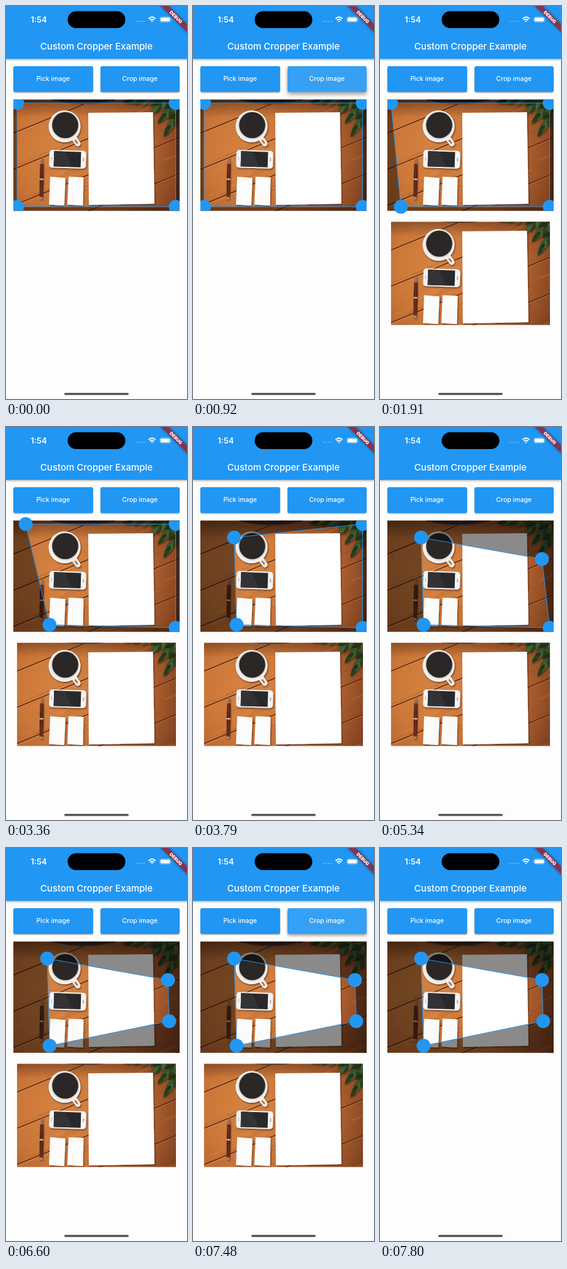
Animation of 295x640 px, one loop 8 s. Source, as an HTML page:

```html
<!DOCTYPE html>
<html lang="en">
<head>
<meta charset="utf-8">
<title>Custom Cropper Example</title>
<style>
  html, body { margin: 0; width: 100%; height: 100%; overflow: hidden; }
  body { position: relative; background: #fdfdfd; font-family: Inter, Roboto, sans-serif; color: #fff; }
  .bar { position: absolute; left: 0; top: 0; width: 295px; height: 86px; background: #2196f3;
    box-shadow: 0 1.5px 3px rgba(0,0,0,.35); }
  .title { position: absolute; top: 56px; width: 100%; font: 500 15px/19px Inter, Roboto, sans-serif; text-align: center; }
  .btn { position: absolute; top: 98px; width: 129.5px; height: 42px; border-radius: 3px; background: #2196f3;
    overflow: hidden; font: 500 10.5px/42px Inter, Roboto, sans-serif; text-align: center;
    box-shadow: 0 calc(1.3px + 2.7px * var(--lift, 0)) calc(2px + 4px * var(--lift, 0)) rgba(0,0,0,.36); }
  .btn span { position: relative; }
  .btn i { position: absolute; left: 50%; top: 50%; width: 180px; height: 180px; margin: -90px; border-radius: 50%;
    background: rgba(255,255,255,.09); transform: scale(var(--ripple, 0)); }
  svg { position: absolute; left: 0; top: 0; }
  svg text { font-family: Inter, Roboto, sans-serif; fill: #fff; }
</style>
</head>
<body>
<div class="bar"><div class="title">Custom Cropper Example</div></div>
<div class="btn" style="left:12px"><span>Pick image</span></div>
<div class="btn" id="crop" style="left:153.5px"><i></i><span>Crop image</span></div>

<svg width="295" height="640" viewBox="0 0 295 640">
  <defs>
    <radialGradient id="wood" gradientUnits="userSpaceOnUse" cx="95" cy="235" r="215">
      <stop offset="0" stop-color="#d78443"/>
      <stop offset=".35" stop-color="#cb7739"/>
      <stop offset=".65" stop-color="#b3622f"/>
      <stop offset="1" stop-color="#70391d"/>
    </radialGradient>
    <linearGradient id="pen">
      <stop offset="0" stop-color="#32130d"/>
      <stop offset=".5" stop-color="#7c321e"/>
      <stop offset="1" stop-color="#38150f"/>
    </linearGradient>
    <linearGradient id="shade" x1="0" y1="0" x2="0" y2="1">
      <stop offset="0" stop-color="#2a120a" stop-opacity=".45"/>
      <stop offset="1" stop-color="#2a120a" stop-opacity="0"/>
    </linearGradient>
    <filter id="soft" x="-20%" y="-20%" width="140%" height="140%">
      <feDropShadow dx="1" dy="1.5" stdDeviation="1.3" flood-color="#2b1208" flood-opacity=".65"/>
    </filter>
    <filter id="bandShadow" x="-20%" y="-60%" width="140%" height="220%">
      <feDropShadow dx="0" dy="0" stdDeviation="2" flood-opacity=".45"/>
    </filter>
    <clipPath id="frame"><rect x="12" y="152.5" width="271" height="181"/></clipPath>
    <g id="photo" clip-path="url(#frame)">
      <rect x="12" y="152" width="271" height="182" fill="url(#wood)"/>
      <g id="boards" fill="none"></g>
      <rect x="12" y="152" width="271" height="30" fill="url(#shade)"/>
      <path d="M74 152Q88 159 125 160T180 152Z" fill="#33231e"/>
      <path d="M80 154Q92 158.500 125 159T172 154" fill="none" stroke="#7d6558" stroke-width=".8"/>
      <g id="leaves" filter="url(#soft)"></g>
      <g filter="url(#soft)">
        <path d="M110 214L117 224" stroke="#eeebe7" stroke-width="9" stroke-linecap="round"/>
        <path d="M113 219L116 223" stroke="#a96a40" stroke-width="2.500" stroke-linecap="round"/>
        <circle cx="95.500" cy="196" r="26" fill="#f3f0ed"/>
      </g>
      <circle cx="96.500" cy="194.500" r="23" fill="#dcd7d2"/>
      <circle cx="96.500" cy="194" r="21.300" fill="#2a2726"/>
      <g transform="rotate(1.800 100 250)">
        <rect x="70.500" y="235" width="60" height="29" rx="5" fill="#f4f4f4" filter="url(#soft)"/>
        <rect x="78" y="237" width="44" height="25" fill="#29292b"/>
        <path d="M78 237H96L108 262H78Z" fill="#333335"/>
        <rect x="125" y="246.500" width="2.500" height="6" rx="1" fill="#bbb"/>
        <path d="M74.500 246.500V252.500" stroke="#aaa"/>
      </g>
      <g filter="url(#soft)" fill="#fbfbfb">
        <path d="M72 278L97 280L95 325L70 323.500Z"/>
        <path d="M102 278L126.500 279L125.500 325L100 323.500Z"/>
        <path d="M134 174L239.500 173L242 322L135 324Z" fill="#fff"/>
      </g>
      <g transform="rotate(1.200 58 280)" filter="url(#soft)">
        <path d="M57.300 246L58.700 246L60 257H56Z" fill="#8d7163"/>
        <path d="M55.500 257H60.500L61 281H55Z" fill="url(#pen)"/>
        <path d="M55 281H61V283.500H55Z" fill="#cdb9a8"/>
        <path d="M55 283.500H61L60.300 311H55.700Z" fill="url(#pen)"/>
        <path d="M56.300 311H59.700V315H56.300Z" fill="#a58c7c"/>
      </g>
    </g>
  </defs>

  <rect x="100.500" y="8.500" width="94" height="27.500" rx="13.750"/>
  <text x="53.500" y="27" font-size="13" font-weight="600" text-anchor="middle">1:54</text>
  <g fill="#fff" fill-opacity=".4">
    <circle cx="213" cy="25" r="1.100"/><circle cx="217" cy="25" r="1.100"/>
    <circle cx="221" cy="25" r="1.100"/><circle cx="225" cy="25" r="1.100"/>
  </g>
  <g fill="none" stroke="#fff" stroke-width="1.900">
    <path d="M232.300 20.700Q238 15.500 243.700 20.700"/>
    <path d="M234.500 23.200Q238 20 241.500 23.200"/>
    <path d="M236.300 24.700Q238 23.300 239.700 24.700L238 26.500Z" fill="#fff" stroke="none"/>
  </g>
  <rect x="250.500" y="17.500" width="18" height="9" rx="2.800" fill="none" stroke="#fff" stroke-opacity=".4" stroke-width=".8"/>
  <rect x="251.700" y="18.700" width="15.600" height="6.600" rx="1.800" fill="#fff"/>
  <path d="M269.600 20.500Q271 22 269.600 23.500Z" fill="#fff" fill-opacity=".5"/>
  <g transform="translate(295 0) rotate(45)">
    <rect x="-36" y="21" width="72" height="9" fill="#81364f" filter="url(#bandShadow)"/>
    <text x="0" y="28.200" font-size="7.400" font-weight="900" text-anchor="middle">DEBUG</text>
  </g>

  <use href="#photo"/>
  <path id="dim" fill="#000" fill-opacity=".46" fill-rule="evenodd" clip-path="url(#frame)"/>
  <path id="outline" fill="none" stroke="#2196f3"/>
  <g id="handles" fill="#2196f3"></g>

  <svg id="result" x="18" y="351.500" width="259" height="168" viewBox="18 158.500 259 168">
    <use href="#photo"/>
  </svg>
  <rect x="95" y="630" width="105" height="3.600" rx="1.800" fill="#555"/>
</svg>

<script>
const LOOP = 8000;
const $ = id => document.getElementById(id);
const mix = (a, b, u) => a + (b - a) * u;

function add(parent, tag, attrs) {
  const el = document.createElementNS('http://www.w3.org/2000/svg', tag);
  for (const key in attrs) el.setAttribute(key, attrs[key]);
  return parent.appendChild(el);
}

let seed = 7;
const random = () => (seed = seed * 16807 % 2147483647) / 2147483647;

function drawWood() {
  const slope = .41;
  for (let i = 0; i < 80; i++) {
    const x = 12 + random() * 250, y = 150 + random() * 230, w = 25 + random() * 60;
    add($('boards'), 'path', {
      d: `M${x} ${y}l${w} ${-w * slope}`, stroke: random() < .5 ? '#7f3d1b' : '#e89b5c',
      'stroke-opacity': .2, 'stroke-width': .6 + random() * 1.6
    });
  }
  for (let y = 207; y < 470; y += 59) {
    add($('boards'), 'path', { d: `M12 ${y}l271 ${-271 * slope}`, stroke: '#4a2212', 'stroke-width': 1.4 });
    add($('boards'), 'path', { d: `M12 ${y + 1.5}l271 ${-271 * slope}`, stroke: '#e29a60', 'stroke-opacity': .45 });
  }
}

function drawLeaves() {
  const greens = ['#24401f', '#36552b', '#455f35', '#1d3119'];
  const branch = (x0, y0, x1, y1, n) => {
    const angle = Math.atan2(y1 - y0, x1 - x0) * 180 / Math.PI;
    for (let i = 0; i < n; i++) {
      const u = i / (n - 1), turn = angle + (i % 2 ? 48 : -48) * (1 - u);
      add($('leaves'), 'path', {
        d: 'M0 0Q7 -6.500 18 0Q7 6.500 0 0', fill: greens[i % 4],
        transform: `translate(${mix(x0, x1, u)} ${mix(y0, y1, u)}) rotate(${turn})`
      });
    }
  };
  branch(246, 149, 208, 154, 8);
  branch(264, 148, 248, 164, 7);
  branch(284, 150, 259, 178, 9);
  branch(288, 162, 266, 198, 9);
}

drawWood();
drawLeaves();

// Corners clockwise from top left: rest, first dragged and final positions.
const corners = [
  { rest: [18, 158], first: [32, 158], last: [67, 180], start: 3360, end: 3790, steps: 5 },
  { rest: [276.5, 158], first: [275, 174], last: [264, 215], start: 4760, end: 5340, steps: 6 },
  { rest: [276.5, 327], first: [276, 315], last: [266, 282], start: 6140, end: 6600, steps: 5 },
  { rest: [18, 327], first: [34, 327], last: [71, 322], start: 1910, end: 2260, steps: 4 }
];
for (const c of corners) {
  c.holder = add($('handles'), 'g', {});
  c.dot = add(c.holder, 'circle', { r: 11.3 });
}

function stepAt(t, { start, end, steps }) {
  if (t < start) return -1;
  return Math.min(steps - 1, Math.floor((t - start) / (end - start) * (steps - 1) + 1e-6));
}

function cornerAt(t, c) {
  const k = stepAt(t, c);
  if (k < 0) return c.rest;
  const u = 1 - (1 - k / (c.steps - 1)) ** 1.4;
  return c.first.map((v, i) => mix(v, c.last[i], u));
}

const presses = [
  { start: 590, end: 920, until: 1400, steps: 4, lift: [.2, .6, .9, 1], ripple: [.25, .5, .75, 1] },
  { start: 7260, end: 7590, until: 7800, steps: 4, lift: [.4, 1, .5, 0], ripple: [.4, .8, 1, 0] }
];

function drawPress(t) {
  const p = presses.find(p => t >= p.start && t < p.until);
  const k = p ? stepAt(t, p) : 0;
  $('crop').style.setProperty('--lift', p ? p.lift[k] : 0);
  $('crop').style.setProperty('--ripple', p ? p.ripple[k] : 0);
}

function draw(t) {
  const points = corners.map(c => {
    const [x, y] = cornerAt(t, c);
    c.dot.setAttribute('cx', x);
    c.dot.setAttribute('cy', y);
    // Handles stay inside the photo until they are dragged.
    c.holder.setAttribute('clip-path', t < c.start ? 'url(#frame)' : 'none');
    return [x, y];
  });
  const quad = 'M' + points.map(p => p.join(' ')).join('L') + 'Z';
  $('outline').setAttribute('d', quad);
  $('dim').setAttribute('d', 'M12 152H283V334H12Z' + quad);
  $('result').style.display = t >= 1910 && t < 7800 ? '' : 'none';
  drawPress(t);
}

const origin = performance.now();
function tick() {
  draw((performance.now() - origin) % LOOP);
  requestAnimationFrame(tick);
}
tick();
</script>
</body>
</html>
```
